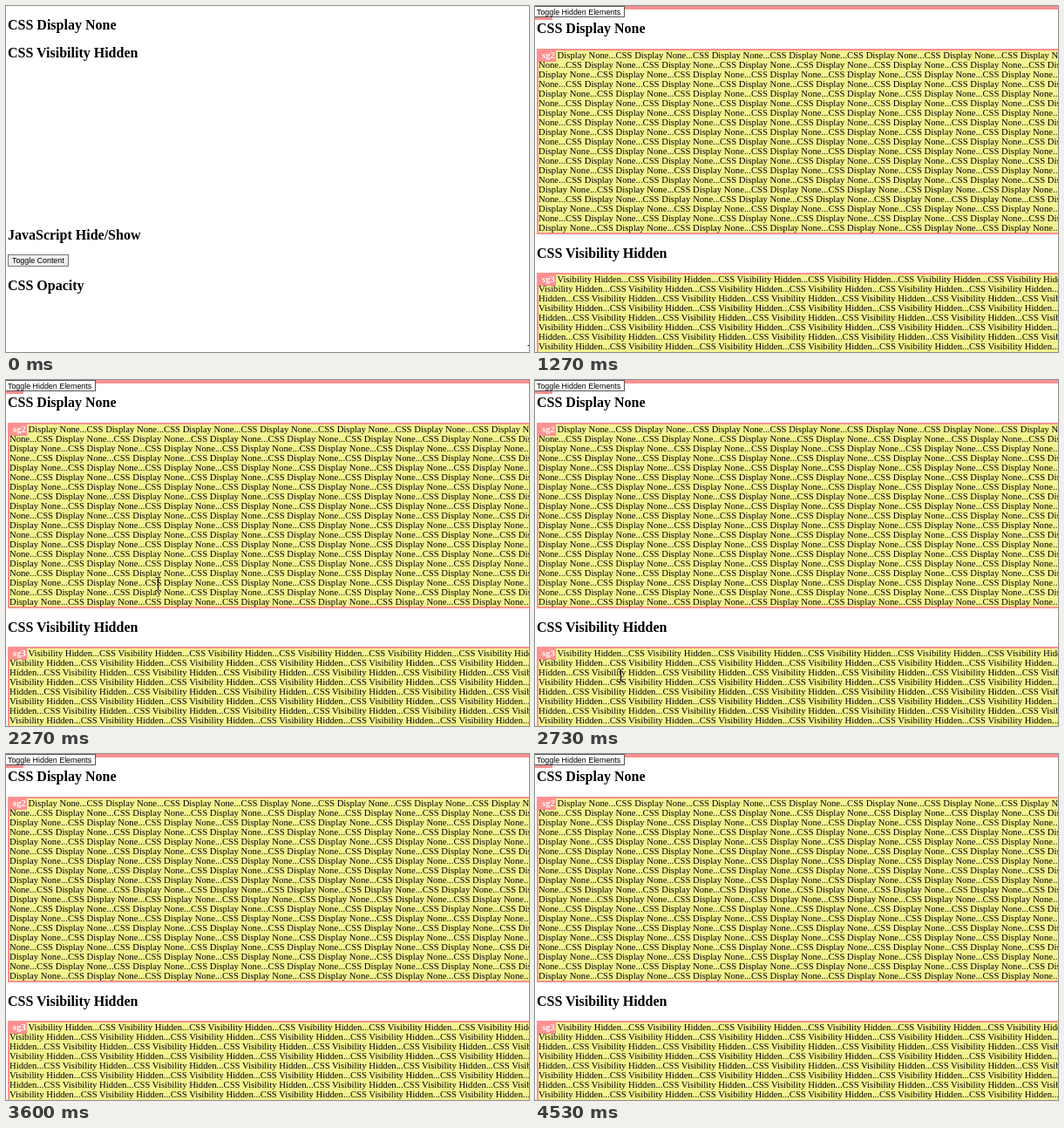
Write an HTML page that moves like this. It is 600 px wide and 397 px high and loops after 5140 ms.

```html
<!DOCTYPE html>
<html lang="en">
<head>
<meta charset="utf-8">
<title>Toggle hidden elements</title>
<style>
  html, body { margin: 0; width: 100%; height: 100%; overflow: hidden; background: #fff; }
  svg { display: block; width: 600px; height: 397px; }
  text { font: 10.67px "Liberation Serif", "Times New Roman", serif; white-space: pre; }
  .heading { font-size: 16px; font-weight: bold; }
  .badge { font-weight: bold; fill: #fff; }
  .control { font: 8.9px "Liberation Sans", Arial, sans-serif; }
  .pink { fill: #ff9090; }
  .yellow { fill: #f3f38f; }
</style>
</head>
<body>
<svg viewBox="0 0 600 397">
  <g id="hidden"></g>
  <g id="revealed"></g>
  <path id="cursor" fill="none" stroke="#000" d="M-3 -7.5H-1M1 -7.5H3M-3 7.5H-1M1 7.5H3M0 -7V7"/>
</svg>
<script>
const LOOP = 5140, REVEAL = 1270, TICK = 1000 / 15;
const hiddenView = document.getElementById('hidden');
const revealedView = document.getElementById('revealed');
const cursor = document.getElementById('cursor');

function add(parent, tag, attributes, content = '') {
  const node = document.createElementNS(parent.namespaceURI, tag);
  for (const name in attributes) node.setAttribute(name, attributes[name]);
  node.textContent = content;
  parent.append(node);
}
const rect = (parent, x, y, width, height, style) =>
  add(parent, 'rect', { x, y, width, height, ...style });
const text = (parent, x, y, content, style) =>
  add(parent, 'text', { x, y, class: style }, content);

// A highlighted paragraph whose lines alternate between two starting words.
function paragraph(top, rows, label, first, evenWord, oddWord) {
  const phrase = `CSS ${first}...`;
  const flow = phrase.repeat(9);
  rect(revealedView, 2, top, 620, rows * 11 + 4, { class: 'pink' });
  rect(revealedView, 4, top + 2, 620, rows * 11, { class: 'yellow' });
  for (let row = 0; row < rows; row++) {
    const start = row ? flow.indexOf(row % 2 ? oddWord : evenWord) : 0;
    text(revealedView, 4, top + 11 + row * 11, flow.slice(start));
  }
  rect(revealedView, 3, top + 1, 21, 14, { class: 'pink' });
  text(revealedView, 8, top + 11, label, 'badge');
}

text(hiddenView, 2, 27, 'CSS Display None', 'heading');
text(hiddenView, 2, 59, 'CSS Visibility Hidden', 'heading');
text(hiddenView, 2, 268, 'JavaScript Hide/Show', 'heading');
rect(hiddenView, 2.5, 285.5, 69, 13, { fill: '#efefef', stroke: '#767676' });
text(hiddenView, 7, 295, 'Toggle Content', 'control');
text(hiddenView, 2, 326, 'CSS Opacity', 'heading');

rect(revealedView, 0, 0, 600, 4, { class: 'pink' });
rect(revealedView, 0, 4, 20, 12, { class: 'pink' });
rect(revealedView, -0.5, 0.5, 103, 12, { fill: '#fff', stroke: '#555' });
text(revealedView, 2, 10, 'Toggle Hidden Elements', 'control');
text(revealedView, 2, 31, 'CSS Display None', 'heading');
paragraph(49, 19, 'sg2', 'Display None', 'Display', 'None');
text(revealedView, 2, 289, 'CSS Visibility Hidden', 'heading');
paragraph(306, 15, 'sg3', 'Visibility Hidden', 'Hidden', 'Visibility');

// Pointer sweeps as [tick, x, y] points; the pointer is outside the page between sweeps.
const sweeps = [
  [[0, 601.5, 397], [1, 601.5, 397], [2, 475.5, 220], [3, 351.5, 55]],
  [[25, 223.5, 11], [28, 219.5, 157], [30, 208.5, 206], [32, 205.5, 190],
   [39, 97.5, 344], [40, 97.5, 344], [41, 98.5, 339], [45, 134.5, 20]],
  [[50, 151.5, 9], [53, 125.5, 276]],
  [[62, 159.5, 392], [65, 110.5, 361], [67, 98.5, 390]]
];

function pointerAt(tick) {
  const sweep = sweeps.find(s => tick >= s[0][0] && tick <= s[s.length - 1][0]);
  if (!sweep) return null;
  const next = sweep.findIndex(point => point[0] >= tick);
  const [endTick, endX, endY] = sweep[next];
  const [startTick, startX, startY] = sweep[Math.max(0, next - 1)];
  const part = endTick > startTick ? (tick - startTick) / (endTick - startTick) : 1;
  const mix = (a, b) => Math.floor(a + (b - a) * part);
  return [mix(startX, endX) + 0.5, mix(startY, endY)];
}

function show(node, visible) {
  node.style.display = visible ? '' : 'none';
}

function draw() {
  const time = performance.now() % LOOP;
  show(hiddenView, time < REVEAL);
  show(revealedView, time >= REVEAL);
  // Small lead so that ticks line up with times rounded to 10 ms.
  const pointer = pointerAt(Math.floor((time + 4) / TICK));
  show(cursor, pointer);
  if (pointer) cursor.setAttribute('transform', `translate(${pointer})`);
  requestAnimationFrame(draw);
}
draw();
</script>
</body>
</html>
```
